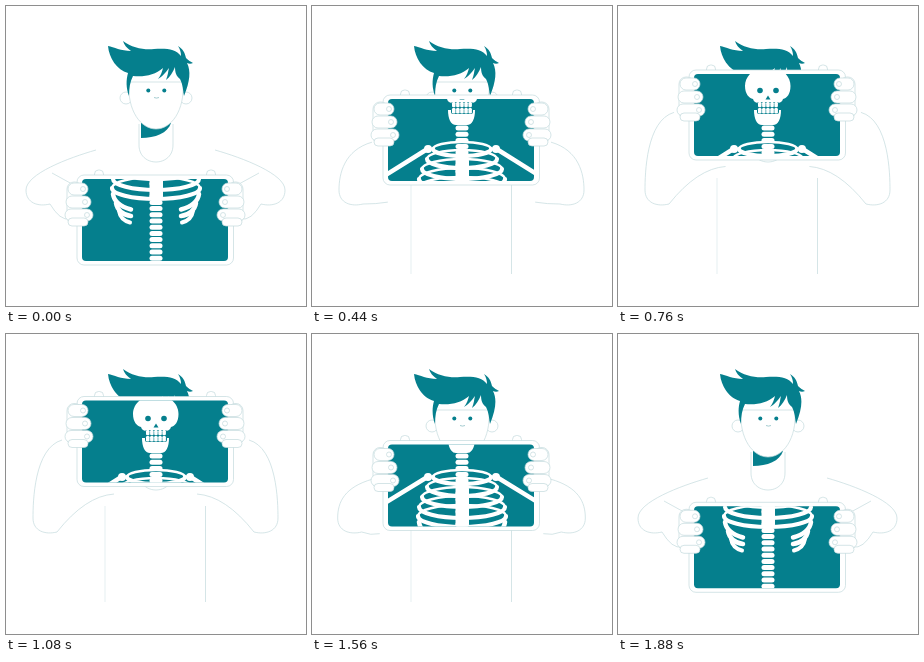
Write an HTML page that moves like this. It is 300 px wide and 300 px high and loops after 1920 ms.

```html
<!DOCTYPE html>
<html lang="en">
<head>
<meta charset="utf-8">
<title>X-ray screen</title>
<style>
  html, body { margin: 0; width: 100%; height: 100%; overflow: hidden; background: #fff; }
  svg { display: block; width: 100vw; height: 100vh; }
  .teal { fill: #057f8d; }
  .line { fill: #fff; stroke: #c3dadd; stroke-width: .7; }
  .open { fill: none; }
  .bone { fill: none; stroke: #fff; stroke-linecap: round; }
  .white { fill: #fff; }
</style>
</head>
<body>
<svg viewBox="0 0 300 300">
  <defs>
    <clipPath id="window"><rect id="hole" x="76" width="146" height="82" rx="4"/></clipPath>
  </defs>

  <g id="torso">
    <path class="line open" d="M99 172V268" opacity=".6"/>
    <path class="line open" d="M199.500 172V268"/>
  </g>
  <path id="armL" class="line"/>
  <path id="armR" class="line" transform="translate(299 0) scale(-1 1)"/>

  <path class="line" d="M133 118V138C132 162 168 162 167 138V118"/>
  <path class="teal" d="M135 117H165C162 127 149 132 135 132Z"/>
  <circle class="line" cx="120" cy="92" r="6"/>
  <circle class="line" cx="180" cy="92" r="6"/>
  <path class="line" d="M123 76C121 105 135 123 150 123C165 123 179 105 177 76Z"/>
  <path class="teal" d="M102 40C108 41 115 45 125 45C121 42 118 39 117 35C126 42 138 44 148 43C160 42 170 43 175 50C175 46 174 43 172 40C177 43 179 47 180 52C182 54 185 56 187 57C185 58 183 58 181 57C185 65 184 75 178 90C177 84 177 79 174 73C170 70 169 66 169 61C167 66 164 71 160 74C162 69 162 66 163 62C160 66 156 71 152 73C155 69 156 66 157 62C149 69 139 71 127 70C124 76 123 82 123 90C120 82 120 74 122 67C111 64 103 52 102 40Z"/>
  <circle class="teal" cx="142.300" cy="84.500" r="2"/>
  <circle class="teal" cx="158.300" cy="84.500" r="2"/>
  <path d="M148 91.500q2.500 1.200 5 0" fill="none" stroke="#8fbfc5" stroke-width=".8"/>

  <g id="frame">
    <rect class="line" x="88.500" y="-9" width="9" height="9" rx="4"/>
    <rect class="line" x="200.500" y="-9" width="9" height="9" rx="4"/>
    <rect class="line" x="71" y="-4" width="156.500" height="90" rx="7"/>
    <rect class="teal" x="76" y="0" width="146" height="82" rx="4"/>
  </g>

  <g clip-path="url(#window)">
    <g id="bones"></g>
    <path id="humerus" class="bone" stroke-width="4.500"/>
    <path class="white" d="M150 61C164 61 172.500 70 172.500 80C172.500 88 169 92 165 93Q164 97 159 97H141Q136 97 135 93C131 92 127 88 127 80C127 70 136 61 150 61Z"/>
    <circle class="teal" cx="142" cy="84.500" r="2.800"/>
    <circle class="teal" cx="158" cy="84.500" r="2.800"/>
    <path class="teal" d="M150 89.500l2.500 4h-5z"/>
    <path class="white" d="M136 104H163C163 113 160 119 155 119H144C139 119 136 113 136 104Z"/>
    <rect class="teal" x="139" y="96" width="22" height="12" rx="2"/>
    <g id="teeth"></g>
  </g>

  <g id="handL"></g>
  <g id="handR"></g>
</svg>
<script>
const LOOP = 1920, STEP = 40, CENTER = 150;
const $ = id => document.getElementById(id);
const set = (id, attrs) => {
  for (const [key, value] of Object.entries(attrs)) $(id).setAttribute(key, value);
};
const box = (x, y, w, h, r) =>
  `<rect class="white" x="${x}" y="${y}" width="${w}" height="${h}" rx="${r}"/>`;
const bone = (d, width) => `<path class="bone" d="${d}" stroke-width="${width}"/>`;

function buildBones() {
  let out = "";
  for (let y = 119.500; y < 258; y += 6.200) out += box(143.500, y, 13, 5, 2.500);

  // [half width, center y, half height] of each closed rib
  const rings = [[29, 143, 7], [35, 153, 9], [40, 163, 10], [43, 173, 11], [44, 182, 11]];
  for (const [rx, cy, ry] of rings) {
    const arc = sweep =>
      `M${CENTER - rx} ${cy}A${rx} ${ry} 0 0 ${sweep} ${CENTER + rx} ${cy}`;
    out += bone(arc(1), 2.500) + bone(arc(0), 4.200);
  }
  for (const side of [1, -1]) {
    const x = d => CENTER - side * d;
    out += bone(`M${x(43)} 188C${x(42)} 196 ${x(34)} 201 ${x(25)} 203.500`, 4.500);
    out += bone(`M${x(40)} 197C${x(39)} 204 ${x(33)} 209 ${x(25)} 210`, 4.500);
    out += bone(`M${x(37)} 205C${x(36)} 211 ${x(32)} 215 ${x(26)} 216.500`, 4);
    out += `<circle class="white" cx="${x(34)}" cy="143" r="4"/>`;
  }
  return out + box(143.500, 150, 13.500, 45, 5);
}

function buildTeeth() {
  let out = "";
  for (let i = 0; i < 5; i++) {
    const x = 140 + i * 4.100;
    out += box(x, 96, 3.500, 5.300, 1.200) + box(x, 102, 3.500, 5.500, 1.200);
  }
  return out;
}

// Finger rows: left, top, width, height
const hand = [[61, 3, 15, 42, 7], [60, 30, 27, 0, 0], [62, 4, 20, 12, 6],
  [60, 17, 25, 12, 6], [59, 30, 28, 12, 6], [62, 39, 20, 8, 4]]
  .filter(f => f[3])
  .map(([x, y, w, h, r]) =>
    `<rect class="line" x="${x}" y="${y}" width="${w}" height="${h}" rx="${r}"/>`)
  .join("") +
  [10, 23, 36].map((y, i) =>
    `<circle class="line" cx="${77 + i * 2}" cy="${y}" r="2.500"/>`).join("");

$("bones").innerHTML = buildBones();
$("teeth").innerHTML = buildTeeth();
$("handL").innerHTML = $("handR").innerHTML = hand;

// Smooth interpolation through rows of [key, value, ...]
function sample(rows, at) {
  const last = rows.length - 1;
  let i = 0;
  while (i < last - 1 && at > rows[i + 1][0]) i++;
  const [a, b] = [rows[i], rows[i + 1]];
  const span = b[0] - a[0], u = (at - a[0]) / span;
  const slope = (j, k) => j === 0 || j === last ? 0 :
    (rows[j + 1][k] - rows[j - 1][k]) / (rows[j + 1][0] - rows[j - 1][0]);
  return a.slice(1).map((v, n) => {
    const k = n + 1, u2 = u * u, u3 = u2 * u;
    return v * (2 * u3 - 3 * u2 + 1) + b[k] * (3 * u2 - 2 * u3) +
      span * (slope(i, k) * (u3 - 2 * u2 + u) + slope(i + 1, k) * (u3 - u2));
  });
}

const lift = [[0, 173], [40, 172.300], [80, 169], [160, 156], [240, 139], [360, 110.500],
  [440, 93], [560, 79], [640, 73], [760, 68], [840, 66.500], [960, 66]];

// Raised amount, upper end x y, elbow x, lower end x y
const arms = [[0, 90, 144, 20, 64, 213], [.32, 64, 152, 23, 62, 199],
  [.75, 60, 136, 27, 76, 196], [1, 56, 106, 27, 108, 160]];

function draw(now) {
  const t = Math.floor(now % LOOP / STEP) * STEP;
  const [y] = sample(lift, Math.min(t, LOOP - t));
  const [ax, ay, ex, bx, by] = sample(arms, (173 - y) / 107);
  const fold = y > 150 ? "M46 167L66 178" : "";
  const arm = `M${ax} ${ay}C${ax - 28} ${ay + 8} ${ex} 168 ${ex} 184` +
    `C${ex} 197 ${ex + 12} 201 ${ex + 24} 198Q${(ex + 24 + bx) / 2} ${by + 2} ${bx} ${by}${fold}`;

  set("armL", { d: arm });
  set("armR", { d: arm });
  set("torso", { visibility: y < 125 ? "visible" : "hidden" });
  set("frame", { transform: `translate(0 ${y})` });
  set("hole", { y });
  set("handL", { transform: `translate(0 ${y})` });
  set("handR", { transform: `translate(298 ${y}) scale(-1 1)` });
  const elbow = ex + 10;
  set("humerus", { d: `M117 142L${elbow} 192M183 142L${300 - elbow} 192` });
}

const start = performance.now();
function tick() {
  draw(performance.now() - start);
  requestAnimationFrame(tick);
}
tick();
</script>
</body>
</html>
```
